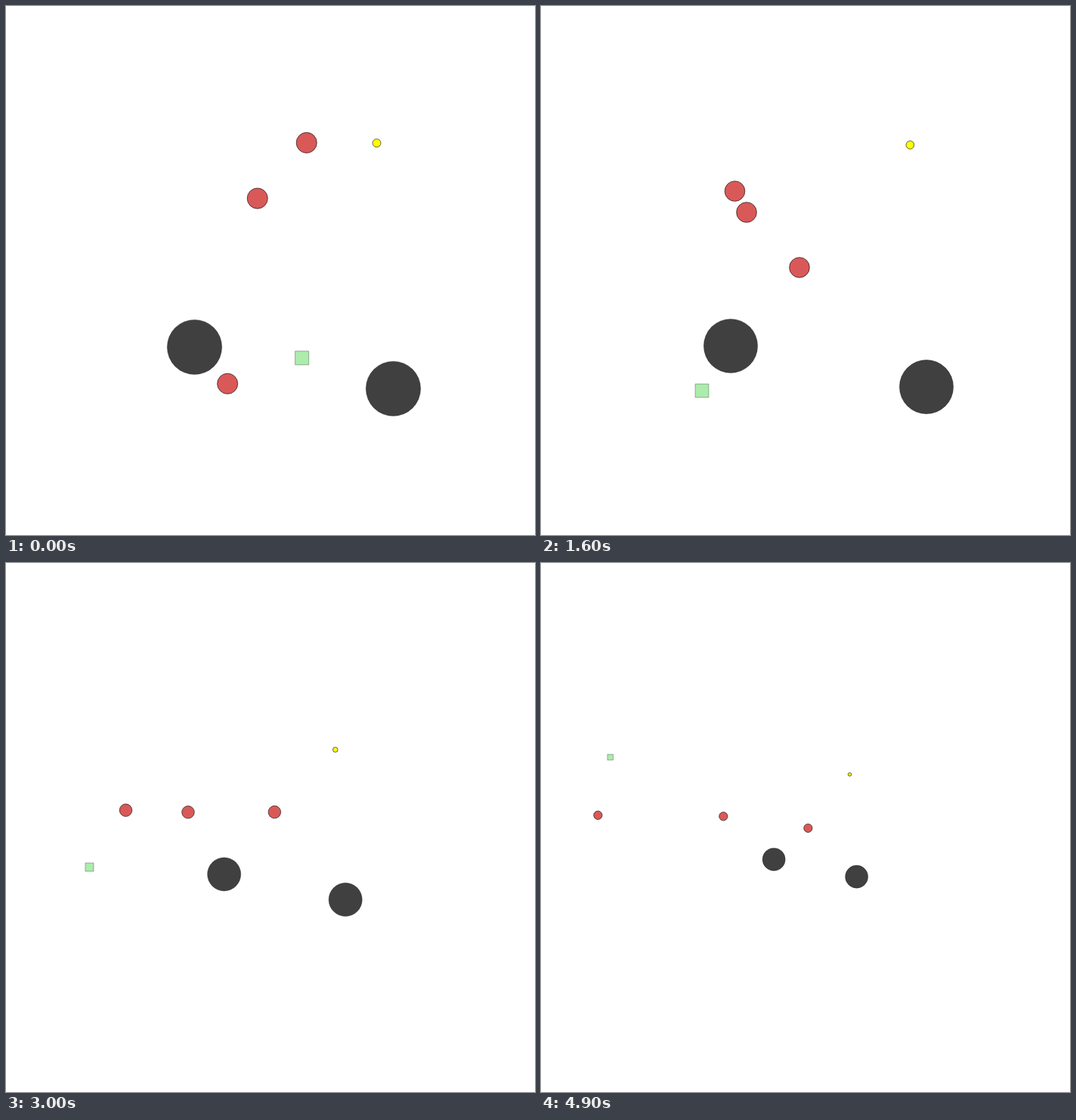
An HTML page with a canvas that plays this animation: 700x700 px, repeating every 5000 ms.

```html
<!DOCTYPE html>
<html lang="en">
<head>
<meta charset="utf-8">
<title>Pursuit</title>
<style>
  html, body { margin: 0; width: 100%; height: 100%; overflow: hidden; background: #fff; }
  canvas { display: block; width: 700px; height: 700px; }
</style>
</head>
<body>
<canvas id="stage" width="700" height="700"></canvas>
<script>
const ctx = document.getElementById('stage').getContext('2d');
const HALF = 350, UNIT = 178.2, STEP = 100, STEPS = 50;

// Every agent passes its key points at these steps, and coasts after its last one
const TIMES = [0, 9, 16, 26, 35, 41, 49];
const REST = [0, 0];

const runner = {
  launch: REST,
  points: [[41, 114], [-18.5, 153], [-137, 159], [-305, 108], [-477, 37], [-527, -77], [-611, -220]]
};
const leader = {
  launch: [0, -8.4],
  points: [[47, -166.5], [-13, -117], [-93.5, -105], [-239.5, -41], [-400, -40]]
};
const follower = {
  launch: REST,
  points: [[-17, -94], [-87, -94], [-78, -77], [-154, -47.5], [-197, -20.5], [-214, -31.5], [-257, -35]]
};
const guard = {
  launch: REST,
  points: [[-56, 147.5], [-17, 99], [-8, -4], [7.5, -58], [8, 4], [8, -2], [8, 2]]
};
const rocks = [[-99, 99.8], [160, 154]];
const food = [138.4, -166.1];

// Cubic path along one axis; inner velocities blend the neighbouring slopes
function along({ launch, points }, axis, n) {
  const last = points.length - 1;
  const span = i => TIMES[i + 1] - TIMES[i];
  const slope = i => (points[i + 1][axis] - points[i][axis]) / span(i);
  const speed = i =>
    i === 0 ? launch[axis] :
    i === last ? slope(last - 1) :
    (slope(i - 1) * span(i) + slope(i) * span(i - 1)) / (span(i - 1) + span(i));

  if (n >= TIMES[last]) return points[last][axis] + speed(last) * (n - TIMES[last]);
  const i = TIMES.findIndex(t => t > n) - 1;
  const u = (n - TIMES[i]) / span(i), v = 1 - u;
  return points[i][axis] * v * v * (1 + 2 * u) + points[i + 1][axis] * u * u * (3 - 2 * u) +
    span(i) * u * v * (speed(i) * v - speed(i + 1) * u);
}

const locate = (agent, n) => [along(agent, 0, n), along(agent, 1, n)];

// The camera only ever zooms out, following the furthest coordinate so far
let reach = 0;
const poses = Array.from({ length: STEPS }, (_, n) => {
  const prey = locate(runner, n);
  const hunters = [leader, follower, guard].map(agent => locate(agent, n));
  reach = Math.max(reach, ...[prey, ...hunters].flat().map(Math.abs));
  return { prey, hunters, zoom: HALF / (UNIT + reach) };
});

function paint(fill, shade) {
  ctx.fillStyle = fill;
  ctx.fill();
  ctx.strokeStyle = `rgba(0,0,0,${shade})`;
  ctx.stroke();
}

function draw({ prey, hunters, zoom }) {
  const at = p => p.map(c => HALF + c * zoom);
  const disc = (p, size, fill, shade) => {
    ctx.beginPath();
    ctx.arc(...at(p), size * UNIT * zoom, 0, Math.PI * 2);
    paint(fill, shade);
  };

  ctx.clearRect(0, 0, 2 * HALF, 2 * HALF);
  hunters.forEach(p => disc(p, 0.075, '#d95959', 0.6));

  const [x, y] = at(prey), r = 0.05 * UNIT * zoom;
  ctx.beginPath();
  ctx.rect(x - r, y - r, 2 * r, 2 * r);
  paint('#acecac', 0.3);

  rocks.forEach(p => disc(p, 0.2, '#404040', 0.3));
  disc(food, 0.03, '#ff0', 0.6);
}

function tick() {
  draw(poses[Math.floor(performance.now() / STEP) % STEPS]);
  requestAnimationFrame(tick);
}
tick();
</script>
</body>
</html>
```
